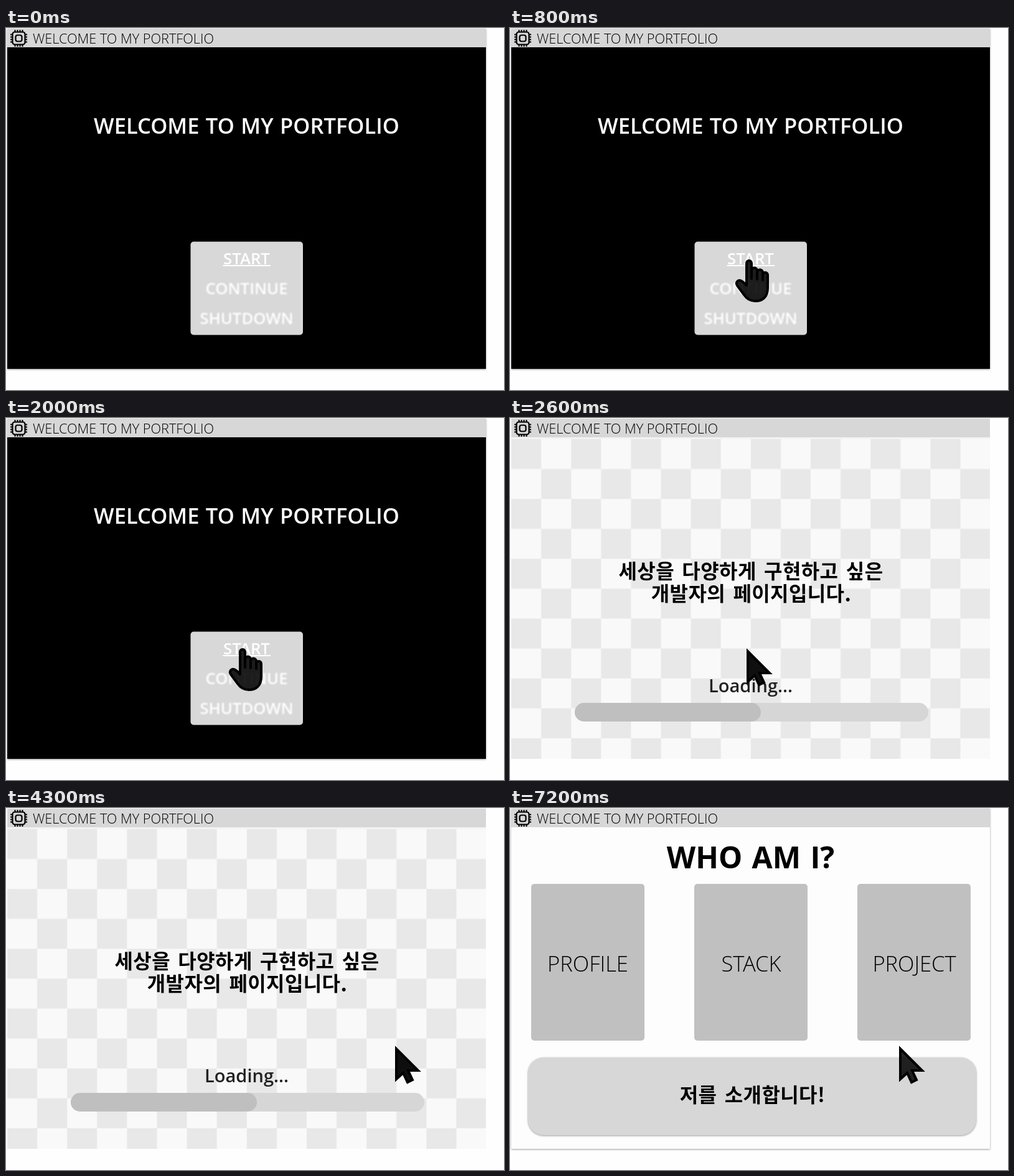
An HTML page that plays this animation: 800x582 px, repeating every 8000 ms.

```html
<!DOCTYPE html>
<html lang="ko">
<head>
<meta charset="utf-8">
<title>Portfolio</title>
<style>
  html, body { margin: 0; width: 100%; height: 100%; overflow: hidden; background: #fefefe; }
  svg { display: block; width: 800px; height: 582px; }
  text { font-family: "Open Sans", "Noto Sans", sans-serif; }
  .light { font-weight: 300; }
  .semi { font-weight: 600; }
  .middle { text-anchor: middle; }
  .korean { font: 700 32px "Noto Sans CJK KR", "Noto Sans CJK", sans-serif; letter-spacing: .4px; word-spacing: 3px; }
  .menu { font-size: 25.7px; fill: #fff; }
  .blurred { filter: blur(1.1px); }
  .shadow { filter: drop-shadow(0 1px 1.5px rgba(0, 0, 0, .4)); }
  .card-label { font-size: 34.5px; }
</style>
</head>
<body>
<svg viewBox="0 0 800 582">
  <defs>
    <pattern id="checker" x="2" y="33.9" width="96.2" height="96.2" patternUnits="userSpaceOnUse">
      <rect width="96.2" height="96.2" fill="#f9f9f9"/>
      <path d="M0 0H48.1V96.2H96.2V48.1H0Z" fill="#e8e8e8"/>
    </pattern>
  </defs>

  <g id="welcome">
    <rect class="shadow" x="2" y="1" width="769" height="547"/>
    <text class="semi middle" x="386.5" y="170" font-size="34.5" word-spacing="1.5" fill="#fff">WELCOME TO MY PORTFOLIO</text>
    <rect x="296.5" y="343.5" width="180.5" height="150" rx="5" fill="#d8d8d8"/>
    <g class="semi middle menu">
      <text x="386.5" y="380">START</text>
      <rect x="348.5" y="381" width="76.5" height="2"/>
      <text class="blurred" x="386.5" y="428">CONTINUE</text>
      <text class="blurred" x="386.5" y="476">SHUTDOWN</text>
    </g>
  </g>

  <g id="loading">
    <rect x="2" y="31" width="769" height="517" fill="url(#checker)"/>
    <rect x="2" y="31" width="769" height="3" fill="#f3f3f3"/>
    <g class="middle">
      <text class="korean" x="387" y="258">세상을 다양하게 구현하고 싶은</text>
      <text class="korean" x="387.5" y="294">개발자의 페이지입니다.</text>
      <text class="semi" x="386.5" y="441" font-size="29" fill="#222">Loading...</text>
    </g>
    <rect x="104" y="458" width="568" height="30" rx="15" fill="#d6d6d6"/>
    <rect x="104" y="458" width="299" height="30" rx="15" fill="#bfbfbf"/>
  </g>

  <g id="about">
    <rect class="shadow" x="2" y="1" width="769" height="547" fill="#fdfdfd"/>
    <g class="middle">
      <text x="386.5" y="97" font-size="48" font-weight="700" word-spacing="3">WHO AM I?</text>
      <g fill="#c0c0c0">
        <rect x="34" y="122" width="182" height="252" rx="5"/>
        <rect x="296" y="122" width="182" height="252" rx="5"/>
        <rect x="558" y="122" width="182" height="252" rx="5"/>
      </g>
      <g class="light card-label">
        <text x="125" y="263">PROFILE</text>
        <text x="387.5" y="263">STACK</text>
        <text x="649.5" y="263">PROJECT</text>
      </g>
      <rect class="shadow" x="29" y="401" width="720" height="125" rx="25" fill="#d7d7d7"/>
      <text class="korean" x="389.5" y="473">저를 소개합니다!</text>
    </g>
  </g>

  <g id="title-bar">
    <rect x="2" y="1" width="769" height="30" fill="#d7d7d7"/>
    <g fill="none" stroke="#000" stroke-width="2.2">
      <rect x="10.5" y="6.5" width="20" height="20" rx="3.5"/>
      <rect x="15.5" y="11.5" width="10" height="10" rx="3"/>
      <path stroke-width="2" d="M14.5 3v4m4-4v4m4-4v4m4-4v4M14.5 26v4m4-4v4m4-4v4m4-4v4
        M7 10.5h4m-4 4h4m-4 4h4m-4 4h4M30 10.5h4m-4 4h4m-4 4h4m-4 4h4"/>
    </g>
    <text class="light" x="43" y="25" font-size="21.7">WELCOME TO MY PORTFOLIO</text>
  </g>

  <g id="cursor" stroke="#000" stroke-width="4">
    <path id="arrow" stroke-miterlimit="8" d="M2 5V54L13 44L20 59L28 55L21 40H37Z"/>
    <g id="hand" stroke-linecap="round" stroke-linejoin="round">
      <path d="M-4 42V6a4 4 0 0 1 8 0V18a4.5 4.5 0 0 1 9 0V21a4.5 4.5 0 0 1 9 0V25a4 4 0 0 1 8 0V46
        C30 60 22 67 10 67C2 67-4 63-8 57L-19 42C-22 37-18 33-14 34C-10 35-8 38-4 42Z"/>
      <path fill="none" d="M4 18V31M13 21V32M22 25V33"/>
    </g>
  </g>
</svg>
<script>
  const LOOP = 8000, STEP = 100;
  const ENTRY = [588, 474], BUTTON = [380, 370], REST = [625, 382];
  const scenes = [
    { id: 'welcome', start: 0, fill: .87 },
    { id: 'loading', start: 2600, fill: .94 },
    { id: 'about', start: 6900, fill: .85 },
  ];
  const byId = id => document.getElementById(id);
  const show = (id, visible) => byId(id).setAttribute('display', visible ? 'inline' : 'none');
  const mix = (from, to, amount) => from.map((v, i) => v + (to[i] - v) * amount);

  function cursorAt(t) {
    if (t < 900) return mix(ENTRY, BUTTON, 1 - (1 - t / 900) ** 1.8);
    if (t < 4200) return BUTTON;
    return t < 4300 ? mix(BUTTON, REST, .6) : REST;
  }

  function draw(t) {
    const scene = scenes.findLast(s => t >= s.start);
    scenes.forEach(s => show(s.id, s === scene));

    const [x, y] = cursorAt(t);
    const overMenu = scene.id === 'welcome' && x > 297 && x < 477 && y > 344 && y < 493;
    show('hand', overMenu);
    show('arrow', !overMenu);
    byId('cursor').setAttribute('transform', `translate(${x} ${y})`);
    byId('cursor').setAttribute('fill-opacity', scene.fill);
  }

  const origin = performance.now();
  function tick() {
    const t = (performance.now() - origin) % LOOP;
    draw(Math.floor(t / STEP) * STEP);
    requestAnimationFrame(tick);
  }
  tick();
</script>
</body>
</html>
```
